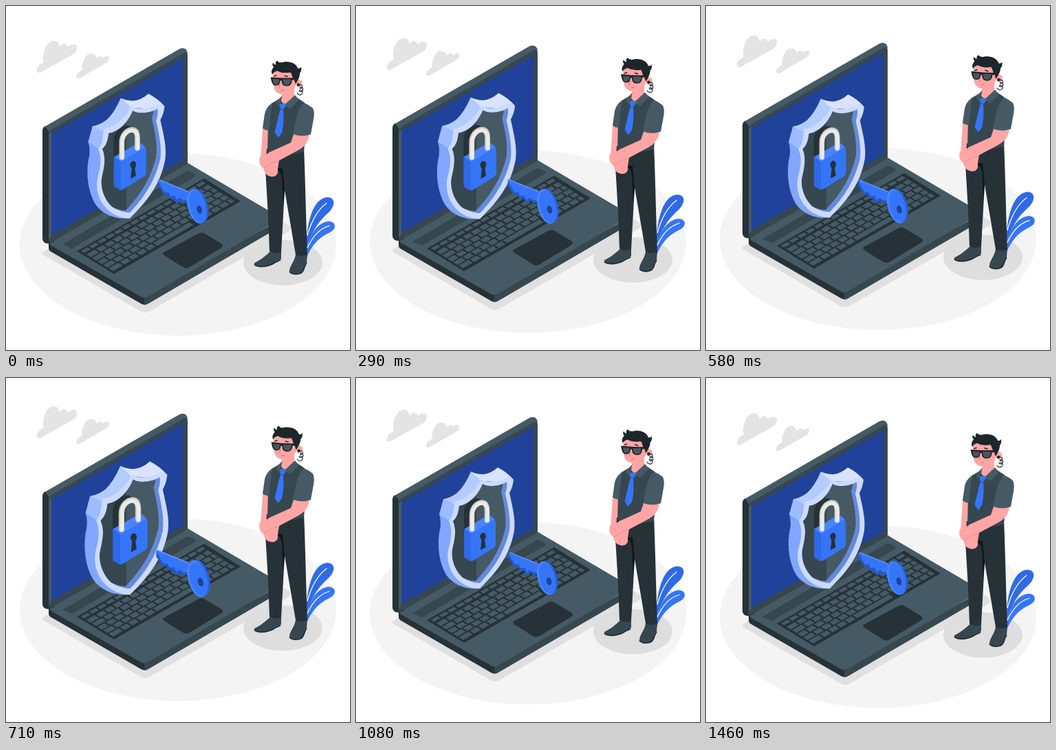
Animation of 500x500 px, one loop 1.5 s. Source, as an HTML page:

```html
<!DOCTYPE html>
<html lang="en">
<head>
<meta charset="utf-8">
<title>Laptop security</title>
<style>
  html, body { margin: 0; width: 100%; height: 100%; overflow: hidden; background: #fff; }
  svg { display: block; width: 100%; height: 100%; }
  .ink { fill: #263238; }
  .slate { fill: #37474f; }
  .steel { fill: #455a64; }
  .skin { fill: #ffa5a5; }
  .blue { fill: #3575f8; }
  .navy { fill: #21429a; }
  .line { fill: none; stroke-linecap: round; stroke-linejoin: round; }
</style>
</head>
<body>
<svg viewBox="0 0 500 500">
  <defs>
    <path id="inner" d="M219 151C211 156 202 157 196 157C191 157 187 156 184 154C178 169 166 183 150 186C149 195 147 203 141 208C147 222 143 236 140 250C138 265 145 281 155 290C163 295 172 298 180 298C198 279 215 256 223 222C225 206 222 190 217 168C219 162 220 157 219 151Z"/>
    <clipPath id="rim"><use href="#inner"/></clipPath>
    <clipPath id="panel"><use href="#inner" x="-6" y="-3"/></clipPath>
  </defs>

  <g id="scene">
    <ellipse cx="250" cy="347" rx="230" ry="132.5" fill="#f4f4f4"/>
    <g fill="#e4e4e4">
      <path d="M47 97C43 96 45 89 50 85L55 82C52 73 57 52 69 51C75 51 77 55 78 60C81 55 87 53 90 60C94 56 102 54 103 60C103 65 101 69 97 71L52 96Q49 98 47 97Z"/>
      <path d="M104 106C100 104 103 98 107 96L111 93C109 87 114 71 122 70C128 69 131 73 132 77C134 73 139 72 141 76C145 73 150 72 150 76C150 80 147 83 144 84L108 105Q105 107 104 106Z"/>
      <path fill="#e0e0e0" d="M62 353L54 358Q51 360 54 362L195 444Q202 448 209 444L411 328Q416 324 411 319L380 302Z"/>
      <ellipse cx="402.500" cy="373.500" rx="57.500" ry="33" fill="#dedede"/>
    </g>

    <!-- plant -->
    <path fill="#306ae8" d="M436 352C437 320 444 284 464 279C474 277 479 284 475 292C470 305 452 306 437 352Z"/>
    <path class="blue" d="M436 366C437 344 447 318 466 314C475 312 480 318 477 324C472 333 452 331 437 366Z"/>
    <path class="line" stroke="#fff" stroke-width="1.300" d="M438 334C444 313 452 297 466 287M438 352C446 336 454 325 470 320"/>

    <!-- laptop -->
    <path class="ink" d="M62 344V352Q62 356 66 358L196 433Q201 436 206 433V420Z"/>
    <path class="slate" d="M201 420V435Q204 435 207 433L394 324Q399 321 399 311Z"/>
    <path class="steel" d="M64 340L262 227L268 231L394 305Q399 309 394 313L206 423Q201 426 196 423L66 349Q62 346 64 340Z"/>
    <path class="slate" d="M82 347L262 241Q265 240 268 241L275 245Q277 247 274 249L96 353Z"/>
    <path class="ink" d="M103 357L288 251L341 284L157 390Z"/>
    <g id="keys" class="steel"></g>
    <path class="ink" d="M230 358L280 331Q284 329 288 331L313 346Q317 349 313 352L267 380Q262 383 257 380L230 363Q226 360 230 358Z"/>
    <path class="ink" d="M53 182Q53 177 57 175L70 176V343Q58 349 54 342Q53 341 53 338Z"/>
    <path class="steel" d="M56 176L252 63Q262 59 264 69L62 184Q61 179 56 176Z"/>
    <path class="slate" d="M62 187Q62 182 66 180L258 69Q264 66 264 73V226Q264 230 260 232L66 344Q62 346 62 341Z"/>
    <path class="steel" d="M62 186L66 184V336L62 340Z"/>
    <path class="navy" d="M66 186L258 76V224L66 334Z"/>

    <!-- guard -->
    <path class="slate" d="M361 374C367 371 377 365 384 357H400V367Q399 371 393 373C386 379 372 382 364 379Q360 377 361 374Z"/>
    <path class="slate" d="M412 385C413 377 420 371 421 361H438L437 373C434 379 435 387 428 390C420 392 412 391 412 385Z"/>
    <path class="line" stroke="#1f292e" stroke-width="1.200" d="M361 377C372 382 386 377 392 373L399 370M412 387C418 392 428 391 431 386L437 374"/>
    <path class="skin" d="M373 177L382 179L383 211L394 222L370 222Q372 198 373 177Z"/>
    <path class="ink" d="M379 208L433 206C435 252 436 310 438 362Q430 366 421 362L405 268L400 358Q391 362 383 357C382 315 379 270 377 238Z"/>
    <path d="M391 236L402 237L405 268L403 290C401 268 403 248 398 241Z" fill="#10161a"/>
    <path class="slate" d="M386 142Q395 137 402 132L419 131L434 141L437 170L433 212Q406 222 380 212L381 175Z"/>
    <path class="steel" d="M386 142Q378 148 376 157L373 178Q377 182 382 181L385 157Z"/>
    <path class="steel" d="M433 141Q440 144 446 149Q449 155 447 165L443 187Q431 192 417 187C421 172 421 153 433 141Z"/>
    <path class="skin" d="M418 187Q429 191 441 188C439 199 434 205 425 210L397 225C396 231 395 235 395 240C396 246 390 250 384 248C377 247 375 240 374 236C369 234 367 226 369 220C373 215 379 217 383 213L414 199Z"/>
    <path class="line" stroke="#e98786" stroke-width="1" d="M395 226C389 228 383 229 380 233L375 236M383 213L379 217"/>
    <path class="skin" d="M402 123L419 118V134L405 144L400 139Z"/>
    <path class="steel" d="M402 130L398 141L402 144L399 149L392 141ZM420 130L426 137L413 150L405 144Z"/>
    <path class="blue" d="M398 143L405 142L407.500 145L403 151C404 164 403.500 175 401 185L395.500 192L390.500 184C394 172 395 162 399 151Z"/>
    <path class="line" stroke="#2457c4" stroke-width="1" d="M399 150L403 151"/>

    <g id="head">
      <path class="skin" d="M388 96L419 94L422 112C421 121 414 128 403 129Q393 128 390 121C388 114 387 105 388 96Z"/>
      <ellipse class="skin" cx="426" cy="113" rx="4.500" ry="5.500"/>
      <path d="M387 100C384 95 388 91 389 89Q386 86 388 83Q390 86 392 86Q391 82 394 80Q397 84 403 82C412 80 422 84 424 91Q427 92 429 89Q430 95 427 98C427 104 424 109 421 114L418 106C415 103 416 99 413 97Q402 99 394 95Q389 96 387 100Z" fill="#1d262b"/>
      <path class="line" stroke="#1d262b" stroke-width="1.500" d="M390 102.500L393 101.500M405 102L409 103"/>
      <path d="M384.500 104L399 105H402L415 105L421 104V107L415.500 108.500C415.500 114 413 117 408 117C402.500 117 401 114 400.500 109H398.500C398.500 114 396 116.500 391.500 116C387 115.500 386 111 384.500 104Z" fill="#1d262b"/>
      <path fill="#4b565c" d="M387.500 106.500L397 107C397 113 395 115 391.500 114.500C389 114 388 111 387.500 106.500ZM402 107L414 107C414 113 412 115.500 408 115.500C404 115.500 402.500 113 402 107Z"/>
      <path class="line" stroke="#d96e70" stroke-width="1" d="M400 123.500L404 122.500M398 114L397 119"/>
      <circle cx="425" cy="115" r="2.300" fill="#1d262b"/>
      <path class="line" stroke="#1d262b" stroke-width="1.100" d="M427 115C432 115 432 120 428 120.500C425 119 430 117 431.500 121C432 125 427 126 426 123.500C428 121 433 125 430 128.500C427 131 424 129 423 127"/>
    </g>
  </g>

  <g id="shield">
    <path fill="#82a6fb" d="M127 176L143 182L180 306C162 308 142 302 131 286C121 269 118 246 121 225Q125 210 121 198Q126 188 127 176Z"/>
    <path fill="#9dbbff" d="M127 176L121 198L136 208L144 182Z"/>
    <path fill="#b3cbff" d="M167 136Q158 157 147 167Q138 174 127 176L143 183L160 182L186 150Z"/>
    <path fill="#d9e3ff" d="M206 130Q196 139 185 140Q175 140 167 136L182 150L222 152L229 148Q220 137 206 130Z"/>
    <path fill="#ccdaff" d="M224 143C214 148 203 151 196 151C190 151 186 150 182 147C176 161 160 177 143 180C142 191 140 202 135 208C141 222 138 235 134 250C131 268 138 285 150 295C159 303 170 306 180 306C200 286 223 262 230 222C232 205 228 190 223 167C227 160 228 155 229 148Z"/>
    <use href="#inner" fill="#6589dc"/>
    <g clip-path="url(#rim)"><g clip-path="url(#panel)">
      <path class="slate" d="M130 140H175V310H130Z"/>
      <path class="steel" d="M175 140H230V310H175Z"/>
      <path class="line" stroke="#263238" stroke-width="8" d="M161 217V196C161 186 169 179 177 179"/>
    </g></g>

    <path fill="#2f69e8" d="M157 222Q157 218 160 218L169 226V266Q166 267 164 265L159 262Q157 261 157 258Z"/>
    <path fill="#4a83fb" d="M158 219L191 200Q194 199 197 201L202 206L168 227Z"/>
    <path class="blue" d="M167 230Q167 227 170 225L199 207Q203 205 203 210V242Q203 245 200 247L171 265Q167 267 167 262Z"/>
    <path class="line" stroke="#c9cbc9" stroke-width="7.500" stroke-linecap="butt" d="M168.500 220V199C168.500 187 177 181 183 181C189 181 190.500 187 190.500 193V207"/>
    <path class="line" stroke="#ecebe6" stroke-width="5" stroke-linecap="butt" d="M169 220V199C169 188 177 182 183 182C188 182 191 187 191 193V207"/>
    <path class="ink" d="M181.500 234C179 230 181 226 184.500 225C189 225 190 231 187 235L188.500 246L181 250L182.500 236Z"/>
  </g>

  <g id="key">
    <path fill="#2459ce" d="M222 255L266 272L266 286L257 286L254 283L248 287L244 280L238 280L236 275L230 274L222 262Z"/>
    <path class="blue" d="M222 255Q222 252 226 254L266 270L263 283L257 282L253 279L248 282L246 276L239 276L237 271L231 271Z"/>
    <path class="line" stroke="#6b9aff" stroke-width="1.300" d="M224.500 254L264 270"/>
    <ellipse cx="279.500" cy="290" rx="12.600" ry="25" transform="rotate(-15 279.500 290)" fill="#2860da"/>
    <ellipse cx="276.500" cy="291" rx="12.600" ry="25" transform="rotate(-15 276.500 291)" fill="#4a83fb"/>
    <ellipse class="blue" cx="278" cy="291.500" rx="11" ry="23" transform="rotate(-15 278 291.500)"/>
    <ellipse class="navy" cx="280.500" cy="295.500" rx="3.600" ry="5.800" transform="rotate(-15 280.500 295.500)"/>
  </g>
</svg>
<script>
const $ = id => document.getElementById(id);

// keyboard, laid out on the skewed plane of the laptop deck
const at = (u, v) => `${(103 + 185 * u + 53 * v).toFixed(1)} ${(357 - 106 * u + 33 * v).toFixed(1)}`;
const key = (u, v, w, h) => `M${at(u, v)}L${at(u + w, v)}L${at(u + w, v + h)}L${at(u, v + h)}Z`;
const ROWS = 6, COLS = 15;
let d = "";
for (let r = 0; r < ROWS; r++) {
  const shift = (r % 3) * 0.012, v = 0.045 + r * 0.153;
  for (let c = 0; c < COLS; c++) {
    if (r === ROWS - 1 && c > 4 && c < 10) continue;
    const u = 0.018 + c * 0.0645;
    const left = c ? u + shift : u;
    const right = u + 0.052 + (c < COLS - 1 ? shift : 0);
    d += key(left, v, right - left, r ? 0.12 : 0.09);
  }
}
d += key(0.365, 0.81, 0.285, 0.12);
$("keys").innerHTML = `<path d="${d}"/>`;

// motion
const LOOP = 1500, FPS = 24, STEPS = LOOP * FPS / 1000;
const BEAT = [[0, 1], [0.1, 1.1], [0.3, 1], [0.4, 1], [0.5, 1.1], [0.6, 1], [1, 1]];

function ramp(stops, p) {
  const i = stops.findIndex(s => s[0] > p);
  const [p0, v0] = stops[i - 1], [p1, v1] = stops[i];
  return v0 + (v1 - v0) * (p - p0) / (p1 - p0);
}

const zoom = (id, x, y, s) =>
  $(id).setAttribute("transform", `translate(${x} ${y}) scale(${s}) translate(${-x} ${-y})`);

function draw(t) {
  const step = Math.floor((t % LOOP + 4) * FPS / 1000);
  const p = (step + 1) % STEPS / STEPS;
  const rise = 1 - Math.abs(1 - 2 * p);
  const s = ramp(BEAT, p);
  $("scene").setAttribute("transform", `translate(0 ${-10 * rise})`);
  $("head").setAttribute("transform", `rotate(${2.4 * rise} 408 130)`);
  zoom("shield", 175, 218, s);
  zoom("key", 257.5, 284, s);
}

const start = performance.now();
function tick() {
  draw(performance.now() - start);
  requestAnimationFrame(tick);
}
tick();
</script>
</body>
</html>
```
